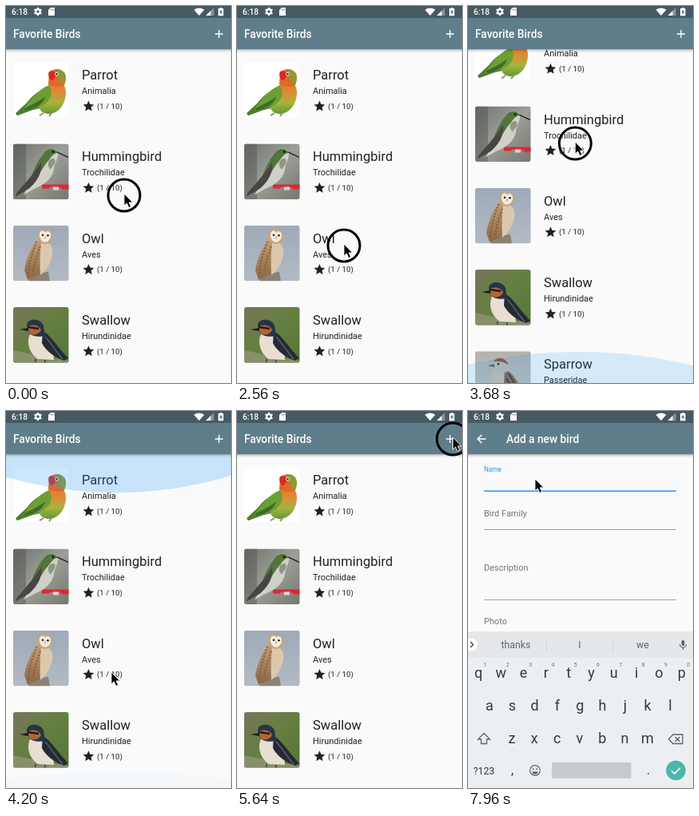
An HTML page that plays this animation: 282x472 px, repeating every 8 s.

```html
<!DOCTYPE html>
<html lang="en">
<head>
<meta charset="utf-8">
<title>Favorite Birds</title>
<style>
  html, body { margin: 0; width: 100%; height: 100%; overflow: hidden; background: #fafafa; }
  svg { display: block; width: 100%; height: 100%; font-family: Roboto, "Noto Sans", sans-serif; }
</style>
</head>
<body>
<svg id="stage" viewBox="0 0 282 472"></svg>
<script>
const LOOP = 8000, PITCH = 102.25, MAX_SCROLL = 93;

const text = (x, y, size, fill, str, extra = '') =>
  `<text x="${x}" y="${y}" font-size="${size}" fill="${fill}" ${extra}>${str}</text>`;
const path = (d, fill, extra = '') => `<path d="${d}" fill="${fill}" ${extra}/>`;
const line = (d, color, width = 1, extra = '') =>
  `<path d="${d}" fill="none" stroke="${color}" stroke-width="${width}" ${extra}/>`;
const rect = (x, y, w, h, fill, extra = '') =>
  `<rect x="${x}" y="${y}" width="${w}" height="${h}" fill="${fill}" ${extra}/>`;
const dot = (x, y, r, fill) => `<circle cx="${x}" cy="${y}" r="${r}" fill="${fill}"/>`;
const gradient = (id, dir, ...colors) => `<linearGradient id="${id}" ${dir}>${colors.map((c, i) =>
  `<stop offset="${i / (colors.length - 1)}" stop-color="${c}"/>`).join('')}</linearGradient>`;
const down = 'x1="0" y1="0" x2="0" y2="1"';
const diagonal = 'x1="0" y1="0" x2="1" y2="1"';

const defs = `<defs>
  ${gradient('parrotBody', down, '#e8752a', '#e08a35', '#a8b33c', '#5f9a35')}
  ${gradient('hummerSky', diagonal, '#6f736c', '#9b9f98', '#74776f')}
  ${gradient('owlSky', down, '#9fa9b8', '#b3bac4')}
  ${gradient('owlWing', down, '#c29a6d', '#8a6746')}
  ${gradient('swallowSky', diagonal, '#77745a', '#64803f', '#54743a')}
  ${gradient('sparrowSky', down, '#b3b2ad', '#c9c8c2')}
  <linearGradient id="shadow" ${down}>
    <stop offset="0" stop-color="#000" stop-opacity=".32"/>
    <stop offset=".4" stop-color="#000" stop-opacity=".1"/>
    <stop offset="1" stop-color="#000" stop-opacity="0"/>
  </linearGradient>
  <clipPath id="photo"><rect width="69.5" height="69.5" rx="2.8"/></clipPath>
  <clipPath id="body"><rect y="54" width="282" height="418"/></clipPath>
</defs>`;

const backdrop = fill => rect(0, 0, 70, 70, fill);

const photos = {
  parrot: backdrop('#fff')
    + path('M44 34C32 34 24 42 17 51L3 64 5 67 24 60 42 56Z', '#4b7d2c')
    + path('M48 24C58 22 66 27 66 38 66 52 58 63 46 65 37 65 31 60 33 51 36 40 41 32 48 24Z', 'url(#parrotBody)')
    + path('M45 29C51 38 47 49 36 55 27 60 18 58 12 61 20 48 31 34 45 29Z', '#6c9f33')
    + path('M14 58C23 53 32 50 40 43 37 55 24 60 14 60Z', '#3f6b2a')
    + path('M45 14C48 8 59 7 64 13 68 19 66 27 61 30 55 31 47 31 44 27Z', '#dd6a28')
    + path('M53 9C60 8 66 13 66 21L64 30C58 24 55 16 53 9Z', '#8f9a35')
    + path('M45 12C49 9 54 13 53 18L49 23C45 22 43 16 45 12Z', '#d9281f')
    + dot(54.5, 15, 2.2, '#fff') + dot(54.5, 15, 1.3, '#222')
    + line('M38 64l-5 3M48 64l-3 4', '#9a8f86', 2),
  hummingbird: backdrop('url(#hummerSky)')
    + rect(0, 0, 16, 70, '#565b55', 'opacity=".5"')
    + path('M36 51H70V57H62L58 54H48L44 56H36Z', '#df2733') + rect(50, 54, 7, 4, '#f4c9c9')
    + path('M38 12C42 5 52 4 56 10 57 18 52 24 51 32 49 44 38 52 27 56L13 64 22 48C25 34 31 22 38 12Z', '#cfd0c6')
    + path('M38 12C42 5 52 4 56 11 48 13 46 20 40 26 34 36 28 45 20 51 24 35 30 22 38 12Z', '#52753c')
    + path('M35 23C30 32 18 46 4 62L3 66 20 56C30 47 37 36 35 23Z', '#4a4542')
    + path('M46 20C51 17 54 19 52 25L47 32C43 29 43 23 46 20Z', '#8d9784')
    + line('M55 10.5L69 17', '#26231f', 1.4) + dot(50, 10, 1.5, '#171717'),
  owl: backdrop('url(#owlSky)')
    + path('M22 62L44 58 46 70H19Z', '#8b8175')
    + path('M31 18C23 26 17 40 14 56L18 68 29 63C39 59 48 48 48 34L45 20Z', 'url(#owlWing)')
    + path('M35 20C45 18 51 26 49 37 47 48 41 57 34 62 33 47 34 34 35 20Z', '#dcc9ad')
    + path('M29 20C25 33 20 45 19 61M34 26C30 38 26 48 25 60', 'none', 'stroke="#6f5238" stroke-width="1.4" stroke-dasharray="2 2"')
    + path('M30 10C32 3 46 3 49 11 50 19 45 24 39 23 32 22 29 17 30 10Z', '#c7a578')
    + path('M33 10C35 5 39 6 40 9 42 6 46 7 47 11 48 17 43 21 40 21 36 21 32 16 33 10Z', '#f2ebe2')
    + dot(37, 12, 1.3, '#2a211c') + dot(43.5, 12.5, 1.3, '#2a211c') + line('M40 13v4', '#c4a58c', 1.5),
  swallow: backdrop('url(#swallowSky)')
    + path('M0 54L38 62 70 67V70H0Z', '#87906a')
    + path('M22 32C16 42 19 57 31 65L51 66 50 46 39 31Z', '#e8ded1')
    + path('M37 30C47 35 53 47 69 64L64 67C52 63 41 55 36 45Z', '#242b35')
    + path('M40 37C47 44 52 54 62 65', 'none', 'stroke="#59606a" stroke-width="1.5"')
    + path('M17 23C17 14 34 13 38 23L40 36C31 38 22 36 20 32Z', '#26344b')
    + path('M18 25C23 20 34 23 35 29 31 36 21 36 20 31Z', '#b5642f')
    + path('M19 26L8 28 19 30Z', '#171b22') + line('M18 25L32 27', '#18202c', 2.5)
    + line('M28 65v4M40 66v4', '#443a32', 1.5),
  sparrow: backdrop('url(#sparrowSky)')
    + path('M30 16C20 23 17 38 24 50L36 58 57 63 68 69 54 46 44 22Z', '#cdbfae')
    + path('M37 22C48 27 57 43 67 65 53 60 41 52 36 40Z', '#84684f')
    + line('M42 28L58 55M39 34L51 53', '#483628', 2)
    + path('M23 14C26 6 39 7 42 15L41 25C34 29 25 26 23 21Z', '#c5bcae')
    + path('M23 13C27 6 38 7 42 17 36 13 29 12 23 13Z', '#92562f')
    + path('M24 16L16 18 24 20Z', '#69594a') + dot(29, 16, 1.3, '#1f1a17')
    + line('M0 66L70 59', '#77695c', 4)
};

const STAR = 'M12 17.27L18.18 21l-1.64-7.03L22 9.24l-7.19-.61L12 2 9.19 8.63 2 9.24l5.46 4.73L5.82 21z';
const birds = [
  ['Parrot', 'Animalia'], ['Hummingbird', 'Trochilidae'], ['Owl', 'Aves'],
  ['Swallow', 'Hirundinidae'], ['Sparrow', 'Passeridae']
];
const birdRow = ([name, family], i) => `<g transform="translate(0 ${70.2 + i * PITCH})">
  <g transform="translate(9 0)" clip-path="url(#photo)">${photos[name.toLowerCase()]}</g>
  ${text(95, 22, 16.5, '#212121', name)}
  ${text(95, 40, 10.97, '#212121', family)}
  ${path(STAR, '#212121', 'transform="translate(95.2 47) scale(.686)"')}
  ${text(114, 58.7, 9.7, '#212121', '(1 / 10)')}
</g>`;

const appBar = (title, x, icon) => rect(0, 54, 282, 5, 'url(#shadow)')
  + rect(0, 0, 282, 54, '#607d8b') + rect(0, 0, 282, 15, '#465a64')
  + text(x, 39.6, 13.72, '#fff', title, 'font-weight="500"') + icon;

const listPage = rect(0, 0, 282, 472, '#fafafa')
  + `<g clip-path="url(#body)"><g id="list">${birds.map(birdRow).join('')}</g>
     <path id="topGlow" fill="#2196f3"/><path id="bottomGlow" fill="#2196f3"/></g>`
  + appBar('Favorite Birds', 9, line('M262 35H272M267 30V40', '#fff', 1.4));

const field = (label, y, underline) => text(20, y, 10.97, '#757575', label)
  + line(`M20 ${underline}H261`, '#858585', .8);
const formPage = rect(0, 0, 282, 472, '#fafafa')
  + `<text id="nameLabel" x="20">Name</text><path id="nameLine" d="M20 100.3H261"/>`
  + field('Bird Family', 132, 148.5) + field('Description', 199.8, 236.3) + field('Photo', 267.3, 283.5)
  + appBar('Add a new bird', 48, line('M22.5 35H12.5M17.3 29.8L12.1 35 17.3 40.2', '#fff', 1.4));

const INK = '#2f3b41', SOFT = '#59656b', MID = 'text-anchor="middle"';
const keyRow = (letters, x0, y) => [...letters].map((c, i) =>
  text(x0 + i * 28.3, y, 18, INK, c, MID)).join('');
const keyboard = rect(0, 276, 282, 196, '#eceff1') + rect(0, 276, 282, 33, '#e4e8ea')
  + dot(4, 292.5, 8, '#fff') + line('M3 289L6.5 292.5 3 296', '#37474f', 1.4)
  + [['thanks', 60], ['I', 140], ['we', 219]].map(([w, x]) => text(x, 297, 12.3, SOFT, w, MID)).join('')
  + line('M98.5 285V301M182 285V301', '#c9ced1', .8)
  + rect(267.6, 287, 3.8, 7, SOFT, 'rx="1.9"') + line('M265.5 292a4 4 0 0 0 8 0M269.5 296v3', SOFT, 1.2)
  + keyRow('qwertyuiop', 13, 334) + keyRow('asdfghjkl', 27, 375) + keyRow('zxcvbnm', 55, 416)
  + [...'1234567890'].map((c, i) => text(21.5 + i * 28.3, 320, 7, '#6d787e', c, MID)).join('')
  + line('M20 403.5L12.5 411H16.5V416.5H23.5V411H27.5Z', SOFT, 1.3)
  + line('M257 405H269V416.5H257L251.5 410.7ZM259.5 408L265.5 413.7M265.5 408L259.5 413.7', SOFT, 1.3)
  + text(20, 454.5, 12.3, INK, '?123', MID) + text(55.5, 455, 16, INK, ',', MID) + text(226, 455, 16, INK, '.', MID)
  + `<circle cx="84" cy="450" r="6.3" fill="none" stroke="${SOFT}" stroke-width="1.2"/>`
  + dot(81.7, 448.3, 1, SOFT) + dot(86.3, 448.3, 1, SOFT) + path('M80.5 451.5H87.5A3.5 3.2 0 0 1 80.5 451.5Z', SOFT)
  + rect(105, 440, 99.5, 20, '#c6cbce', 'rx="2"')
  + dot(260.5, 450, 12.3, '#4db6ac') + line('M255 450.3L258.8 454 266 446.7', '#fff', 1.6);

const statusIcons = text(7, 11, 10.2, '#fff', '6:18', 'font-weight="500"')
  + '<circle cx="40" cy="7" r="3" fill="none" stroke="#fff" stroke-width="2"/>'
  + line('M40 1.8V12.2M35.5 4.4L44.5 9.6M44.5 4.4L35.5 9.6', '#fff', 1.8) + dot(40, 7, 1.7, '#465a64')
  + path('M56 2H61V12H53V5Z', '#fff') + line('M56.5 3.5v2M58.2 3.5v2M59.8 3.5v2', '#465a64', .7)
  + path('M235.5 4.8Q242 .2 248.5 4.8L242 12Z', '#fff')
  + path('M260.5 2V12H250.5Z', '#fff', 'opacity=".35"') + path('M256.5 6V12H250.5Z', '#fff')
  + path('M268 2H270.5V3H272.5V12.2H266V3H268Z', '#fff') + path('M269.8 4.5L267.5 8H269V10.8L271.2 7H269.8Z', '#465a64');

const pointer = '<circle id="ring" cy="1" r="20" fill="none" stroke="#000" stroke-width="3"/>'
  + path('M0 -1V14L3.4 10.9 5.8 16.4 8.6 15.2 6.2 9.9H10.8Z', '#000', 'stroke="#fff" stroke-width=".9"');

const stage = document.getElementById('stage');
stage.innerHTML = `${defs}<g>${listPage}</g><g id="form">${formPage}</g>${statusIcons}
  <g id="keyboard">${keyboard}</g><g id="pointer">${pointer}</g>`;
const el = Object.fromEntries([...stage.querySelectorAll('[id]')].map(n => [n.id, n]));
const set = (node, attrs) => { for (const k in attrs) node.setAttribute(k, attrs[k]); };

const clamp = (v, lo = 0, hi = 1) => Math.min(hi, Math.max(lo, v));
const mix = (a, b, p) => a + (b - a) * p;
const span = (t, a, b) => clamp((t - a) / (b - a));
const smooth = p => p * p * (3 - 2 * p);
const easeOut = p => 1 - (1 - p) ** 3;

// Keys are [time, ...values]
function track(keys, t, ease = p => p) {
  const i = keys.findIndex(k => k[0] > t);
  if (i === 0) return keys[0].slice(1);
  if (i < 0) return keys[keys.length - 1].slice(1);
  const a = keys[i - 1], b = keys[i], p = ease(span(t, a[0], b[0]));
  return a.slice(1).map((v, j) => mix(v, b[j + 1], p));
}

const pointerKeys = [
  [0, 148, 236], [840, 148, 233], [1270, 148, 322], [1360, 148, 322], [2500, 134, 299],
  [2580, 134, 299], [3260, 135, 125], [3476, 135, 125], [4140, 132, 328], [4320, 132, 328],
  [5480, 270.5, 34], [6440, 270.5, 34], [7050, 84, 86]
];
const pressed = [[0, 4160], [5520, 5800], [7220, 7400]];
// Glow keys hold height scale and opacity
const bottomKeys = [[2950, 0, 0], [3260, .8, .23], [3480, .8, .23], [3680, .69, .17], [4200, .35, .025], [4480, 0, 0]];
const topKeys = [[3800, 0, 0], [4140, .85, .226], [4220, .85, .226], [4480, .5, .1], [4840, 0, 0]];

// Overscroll glow: a wide circle squashed vertically, growing from an edge
function drawGlow(node, keys, t, edge, dir) {
  const [scale, opacity] = track(keys, t);
  const radius = 423, height = 56.7, cx = 138;
  const sag = x => height - radius + Math.sqrt(radius ** 2 - (x - cx) ** 2);
  const y = x => edge + dir * scale * sag(x);
  set(node, {
    d: `M0 ${edge}V${y(0)}A${radius} ${Math.max(.01, radius * scale)} 0 0 ${dir > 0 ? 0 : 1} 282 ${y(282)}V${edge}Z`,
    opacity
  });
}

function render(t) {
  const [x, y] = track(pointerKeys, t, smooth);
  set(el.pointer, { transform: `translate(${x} ${y})` });
  set(el.ring, { visibility: pressed.some(([a, b]) => t >= a && t < b) ? 'visible' : 'hidden' });

  const scroll = t < 2560 || t > 4300 ? 0 : clamp((t < 3400 ? 288 : 218) - y, 0, MAX_SCROLL);
  set(el.list, { transform: `translate(0 ${-scroll})` });
  drawGlow(el.topGlow, topKeys, t, 54, 1);
  drawGlow(el.bottomGlow, bottomKeys, t, 472, -1);

  const open = span(t, 5940, 6270);
  set(el.form, { opacity: open ** 1.7, transform: `translate(0 ${118 * (1 - easeOut(smooth(open)))})` });

  const focus = smooth(span(t, 7400, 7600)), focused = t >= 7400;
  set(el.nameLabel, {
    y: mix(91, 76, focus), 'font-size': mix(10.97, 8.23, focus), fill: focused ? '#2196f3' : '#757575'
  });
  set(el.nameLine, { stroke: focused ? '#2196f3' : '#858585', 'stroke-width': mix(.8, 1.6, focus) });
  set(el.keyboard, { transform: `translate(0 ${200 * (1 - easeOut(span(t, 7480, 7760)))})` });
}

function tick() {
  render(performance.now() % LOOP);
  requestAnimationFrame(tick);
}
tick();
</script>
</body>
</html>
```
